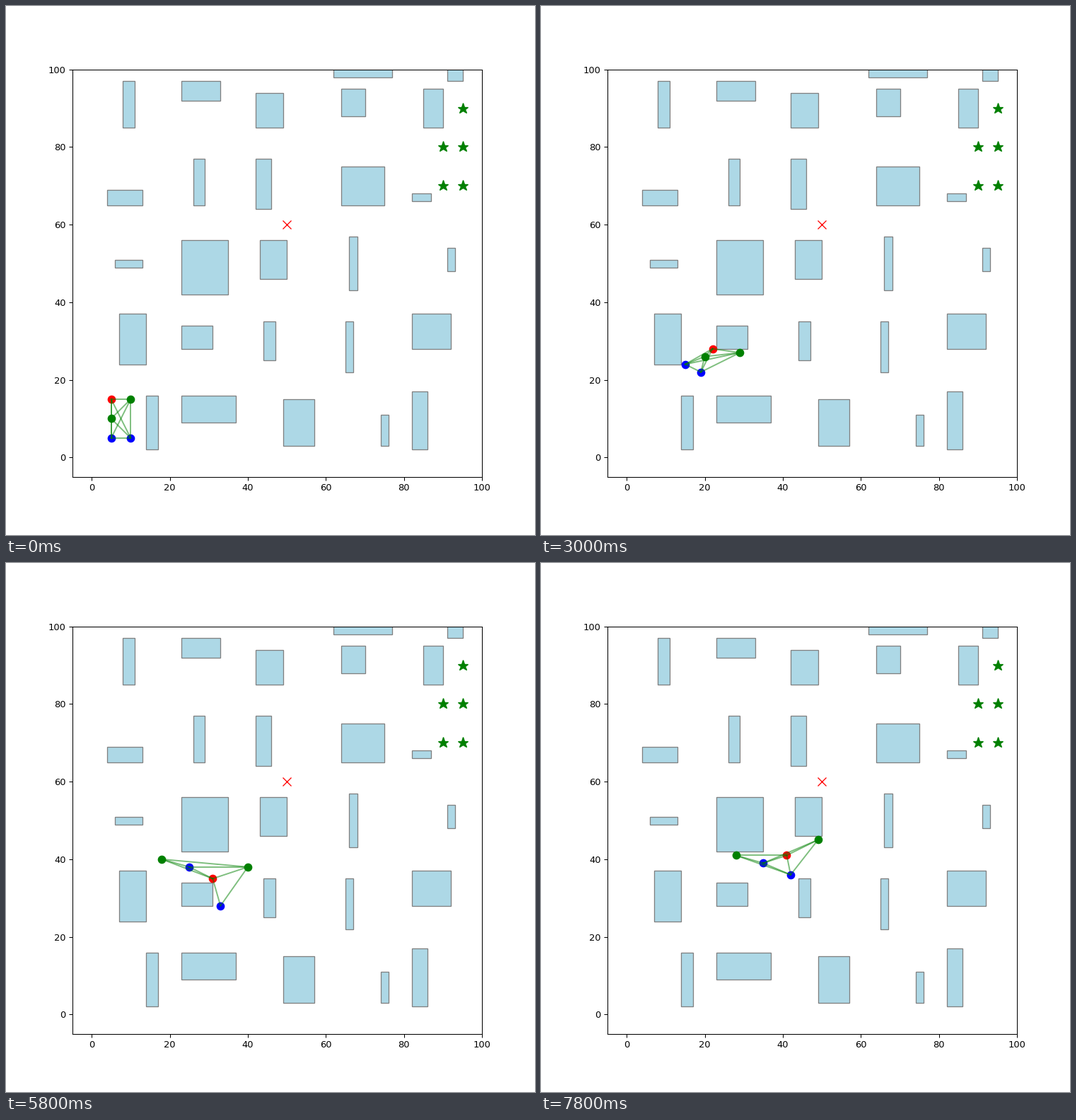
Animation of 748x748 px, one loop 8000 ms. Source, as a matplotlib script:

```python
from itertools import combinations

import matplotlib.pyplot as plt
import numpy as np
from matplotlib.animation import FuncAnimation
from matplotlib.patches import Rectangle

STEPS, STEP_MS = 40, 200
SPRINT = 9  # steps every robot takes for its first leg

# Obstacles by left edge: (bottom, width, height)
COLUMNS = {
    4: [(65, 9, 4)], 6: [(49, 7, 2)], 7: [(24, 7, 13)], 8: [(85, 3, 12)],
    14: [(2, 3, 14)],
    23: [(9, 14, 7), (28, 8, 6), (42, 12, 14), (92, 10, 5)],
    26: [(65, 3, 12)],
    42: [(64, 4, 13), (85, 7, 9)], 43: [(46, 7, 10)], 44: [(25, 3, 10)],
    49: [(3, 8, 12)], 62: [(98, 15, 5)],
    64: [(65, 11, 10), (88, 6, 7)], 65: [(22, 2, 13)], 66: [(43, 2, 14)],
    74: [(3, 2, 8)],
    82: [(2, 4, 15), (28, 10, 9), (66, 5, 2)], 85: [(85, 5, 10)],
    91: [(48, 2, 6), (97, 4, 6)],
}
BLOCKS = [(x, *rest) for x, column in COLUMNS.items() for rest in column]
GOALS = [(x, y) for x in (90, 95) for y in range(70, x, 10)]

# Each robot's turning points; timing follows from the distances
ROUTES = [
    ("red", [(5, 15), (16, 24), (22, 28), (22, 33), (26, 36), (31, 35),
             (35, 38), (41, 41)]),
    ("green", [(5, 10), (15, 21), (16, 21), (20, 26), (15, 35), (18, 40),
               (22, 41), (28, 41)]),
    ("green", [(10, 15), (23, 23), (29, 27), (37, 32), (36, 33), (40, 38),
               (44, 41), (44, 42), (49, 45)]),
    ("blue", [(10, 5), (12, 18), (15, 24), (20, 33), (25, 38), (29, 40),
              (35, 39)]),
    ("blue", [(5, 5), (14, 16), (24, 27), (28, 27), (30, 25), (33, 28),
              (33, 29), (36, 31), (39, 33), (42, 36)]),
]


def walk(route):
    """Grid cell at every step, moving one cell (also diagonally) per step."""
    route = np.array(route)
    legs = np.abs(np.diff(route, axis=0)).max(axis=1)
    legs[0] = SPRINT
    times = np.concatenate([[0], np.cumsum(legs)])
    steps = np.arange(STEPS)
    return np.round([np.interp(steps, times, axis) for axis in route.T]).T


def crosses(p, q, block):
    """True if segment pq passes through the inside of the block."""
    lo, hi = 0.0, 1.0
    for axis in (0, 1):
        start, d = p[axis], q[axis] - p[axis]
        low, high = block[axis], block[axis] + block[axis + 2]
        if d == 0:
            if not low < start < high:
                return False
            continue
        a, b = sorted(((low - start) / d, (high - start) / d))
        lo, hi = max(lo, a), min(hi, b)
    return hi - lo > 1e-9


fig, ax = plt.subplots(figsize=(8, 8), dpi=93.5)
ax.set_xlim(-5, 100)
ax.set_ylim(-5, 100)

for x, y, w, h in BLOCKS:
    ax.add_patch(Rectangle((x, y), w, h, facecolor="lightblue",
                           edgecolor="gray", linewidth=1))
for x, y in GOALS:
    ax.plot(x, y, "*", color="green", markersize=12)
ax.plot(50, 60, "x", color="red", markersize=10)

walks = [walk(route) for _, route in ROUTES]
dots = [ax.plot([], [], "o", color=c, markersize=8)[0] for c, _ in ROUTES]
pairs = list(combinations(range(len(ROUTES)), 2))
links = [ax.plot([], [], color="green", alpha=0.5)[0] for _ in pairs]


def update(step):
    spots = [cells[step] for cells in walks]
    for dot, (x, y) in zip(dots, spots):
        dot.set_data([x], [y])
    # Robots are linked while they can see each other
    for link, (i, j) in zip(links, pairs):
        p, q = spots[i], spots[j]
        link.set_data([p[0], q[0]], [p[1], q[1]])
        link.set_visible(not any(crosses(p, q, b) for b in BLOCKS))
    return dots + links


anim = FuncAnimation(fig, update, frames=STEPS, interval=STEP_MS,
                     init_func=lambda: update(0), repeat=True, repeat_delay=0)
plt.show()
```
